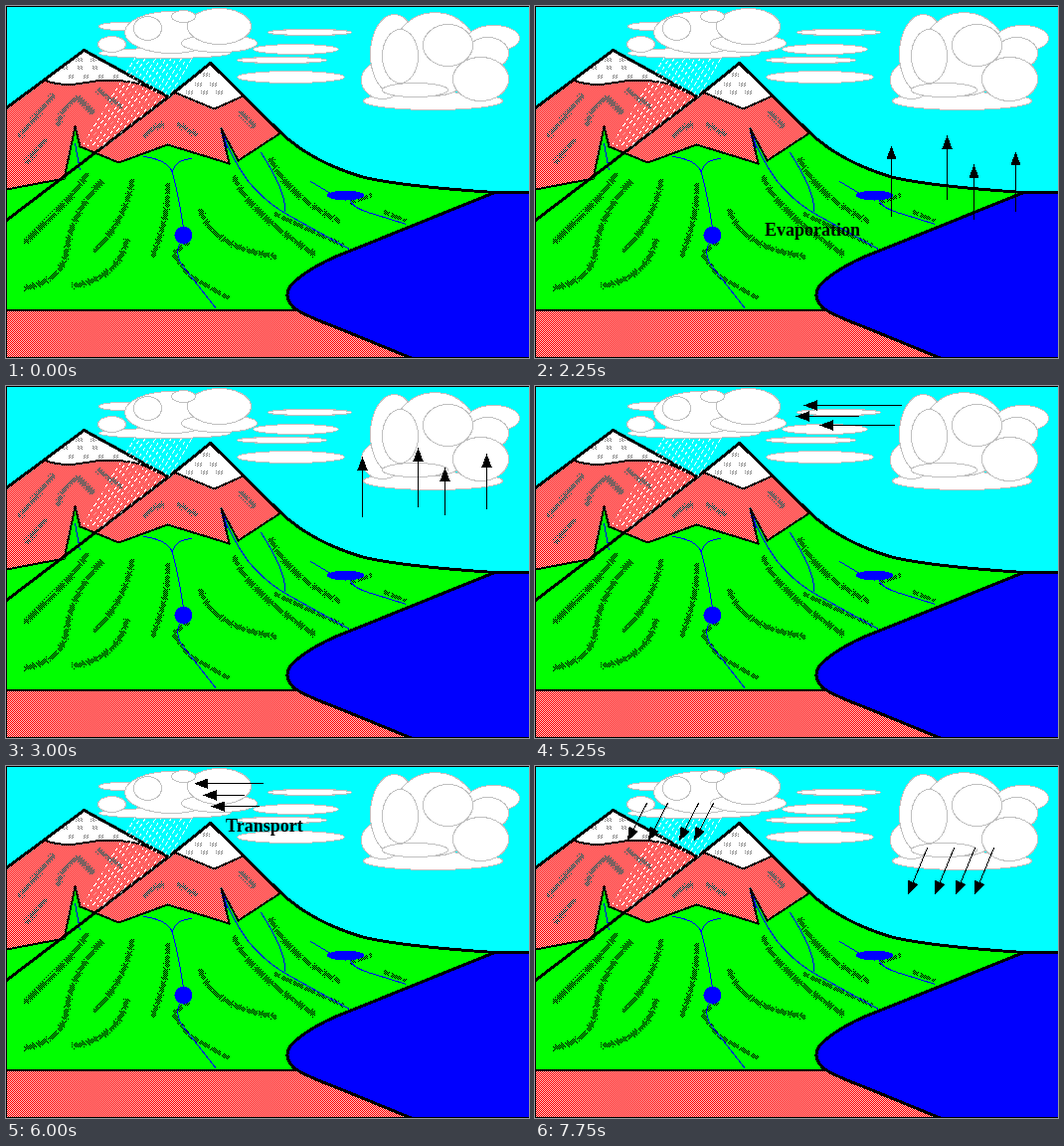
An HTML page for the animation above (8 s loop, 526 by 354 pixels).

```html
<!DOCTYPE html>
<html lang="en">
<head>
<meta charset="utf-8">
<title>Water cycle</title>
<style>
html, body { margin: 0; width: 100%; height: 100%; overflow: hidden; }
svg { display: block; width: 526px; height: 354px; overflow: hidden; shape-rendering: crispEdges; }
.ink { fill: none; stroke: #000; stroke-width: 3; stroke-linejoin: round; }
.rock { fill: url(#rock); }
.river { fill: none; stroke: #00f; }
.cloud { fill: #fff; stroke: #c0c0c0; }
.rain { fill: none; stroke: #fff; stroke-dasharray: 4 3; }
.core { fill: none; stroke: url(#dense); stroke-width: 4; stroke-dasharray: 11 2; }
.halo { fill: none; stroke: url(#sparse); stroke-width: 7; }
.fleck { fill: none; stroke: url(#grey); stroke-width: 4; stroke-dasharray: 7 8; }
#poses text { font: bold 18px "Liberation Serif", serif; }
#poses path { stroke: #000; }
#poses { animation: poses 8s step-end infinite; }
/* Each pose sits one stage height below the previous one. */
@keyframes poses {
  0% { transform: translateY(0); }
  18.75% { transform: translateY(-354px); }
  28.125% { transform: translateY(-708px); }
  37.5% { transform: translateY(-1062px); }
  46.875% { transform: translateY(-1416px); }
  65.625% { transform: translateY(-1770px); }
  75% { transform: translateY(-2124px); }
  84.375% { transform: translateY(-2478px); }
  96.875%, 100% { transform: translateY(-2832px); }
}
</style>
</head>
<body>
<svg viewBox="0 0 526 354">
  <defs>
    <pattern id="rock" width="2" height="2" patternUnits="userSpaceOnUse">
      <path fill="#f00" d="M0 0h2v2H0z"/><path fill="#ffc0c0" d="M1 0h1v1H1zM0 1h1v1H0z"/>
    </pattern>
    <pattern id="dense" width="2" height="2" patternUnits="userSpaceOnUse">
      <path d="M0 0h1v1H0zM1 1h1v1H1z"/>
    </pattern>
    <pattern id="sparse" width="4" height="4" patternUnits="userSpaceOnUse">
      <path d="M0 0h1v1H0zM2 2h1v1H2z"/>
    </pattern>
    <pattern id="grey" width="3" height="2" patternUnits="userSpaceOnUse">
      <path fill="#777" d="M0 0h1v1H0zM1 1h1v1H1z"/>
    </pattern>
    <path id="front" d="M0 215L163 91L205 57L276 127"/>
    <path id="slope" d="M276 127Q308 157 360 172Q400 181 491 187"/>
    <path id="foot" d="M0 184L58 173L69 121L74 141L113 157L162 139L224 158L216 123L233 155L276 127"/>
    <path id="back" d="M0 102L78 44L163 91"/>
    <path id="backSnow" d="M38 74Q55 81 77 77Q105 71 135 78L163 91L78 44z"/>
    <path id="frontSnow" d="M168 86L209 103L238 90L205 57z"/>
    <path id="sea" d="M530 187H491L330 252Q297 267 285 282Q278 293 290 304Q305 313 330 322L408 354V360H530z"/>
    <clipPath id="behindRidge"><path d="M70 40H200V61L163 91L69 162z"/></clipPath>
    <g id="gullies">
      <path d="M82 168Q64 198 18 238"/>
      <path d="M97 176Q66 208 61 245Q58 276 18 284"/>
      <path d="M127 174Q122 214 88 248"/>
      <path d="M122 234Q114 274 66 282"/>
      <path d="M163 178Q164 212 147 253"/>
      <path d="M229 171Q242 206 311 250"/>
      <path d="M195 204Q207 243 272 252"/>
      <path d="M266 153Q282 190 336 217"/>
    </g>
    <path id="crags" d="M48 89L13 132M73 92Q55 101 52 122M72 92L88 108M40 134L20 158M92 84L117 102M139 132Q146 122 160 119M172 118L192 130M235 106L250 122"/>
  </defs>

  <path fill="#0ff" d="M0 0H526V354H0z"/>
  <path class="rock" d="M0 102L78 44L163 92L205 57L276 127V190H0zM0 305H420V354H0z"/>
  <path fill="#0f0" d="M0 184L58 173L69 121L74 141L113 157L162 139L224 158L216 123L233 155L276 127Q308 157 360 172Q400 181 491 187V305H0z"/>
  <use href="#backSnow" fill="#fff"/><use href="#frontSnow" fill="#fff"/>
  <use href="#sea" fill="#00f"/>

  <use href="#gullies" class="halo"/><use href="#gullies" class="core"/>
  <use href="#crags" class="halo"/><use href="#crags" class="core" style="stroke-width:3"/>
  <path class="core" stroke-dashoffset="5" d="M184 237L168 249L184 271L224 294M270 209L340 241M346 198L368 190M380 207L402 216"/>
  <path class="fleck" d="M70 54H91M56 62H100M62 71H116M198 69H212M190 79H218M181 87H226"/>

  <g transform="translate(.5 .5)">
    <g class="river">
      <path d="M138 151Q162 154 167 167M187 153Q169 154 167 167Q173 190 178 222M174 239Q169 250 178 262L211 304"/>
      <path d="M69 138L74 165M216 124Q226 153 244 177Q261 197 282 209L345 244M256 147Q282 187 280 207"/>
      <path d="M306 176L326 188M346 195Q348 203 370 209L402 219"/>
      <path stroke-width="3" d="M217 126L221 143"/>
    </g>
    <circle cx="178" cy="230" r="9" fill="#00f"/>
    <ellipse cx="341" cy="190" rx="18.5" ry="5" fill="#00f"/>
    <g class="ink">
      <use href="#back"/><use href="#front"/><use href="#slope"/><use href="#sea"/>
      <g stroke-width="2"><use href="#backSnow"/><use href="#frontSnow"/><use href="#foot"/></g>
      <path style="stroke-width:2" d="M0 305H290"/>
    </g>
    <g id="rain" class="rain" clip-path="url(#behindRidge)"></g>
    <g id="clouds" class="cloud"></g>
    <path fill="none" stroke="#000" d="M526 0H0V353H526"/>
  </g>
  <g id="poses"></g>
</svg>
<script>
const svgNS = "http://www.w3.org/2000/svg";
const byId = id => document.getElementById(id);

function add(parent, tag, attrs = {}) {
  const node = document.createElementNS(svgNS, tag);
  for (const name in attrs) node.setAttribute(name, attrs[name]);
  return parent.appendChild(node);
}

function puff(cx, cy, rx, ry) {
  add(byId("clouds"), "ellipse", { cx, cy, rx, ry });
}

// Rain cloud over the mountains
puff(159, 47, 66, 5);
puff(115, 20, 22, 4);
puff(166, 26, 47, 21);
puff(106, 38, 14, 8);
puff(142, 22, 14, 12);
puff(214, 37, 38, 9);
puff(214, 20, 32, 18);
puff(178, 10, 12, 6);

// Thin streaks
puff(305, 26, 42, 3);
puff(291, 43, 43, 5);
puff(277, 54, 45, 3);
puff(286, 71, 54, 6);

// Tall cloud over the sea
puff(429, 95, 70, 9);
puff(378, 74, 21, 19);
puff(390, 48, 24, 40);
puff(431, 48, 43, 42);
puff(490, 32, 26, 13);
puff(484, 47, 21, 16);
puff(477, 73, 28, 22);
puff(444, 39, 25, 21);
puff(396, 50, 18, 27);
puff(411, 84, 33, 7);

for (let i = 0; i < 12; i++) {
  add(byId("rain"), "path", { d: `M${130 + 5.2 * i} 51l-54 90`, "stroke-dashoffset": i * 3 });
}

const lerp = (a, b, t) => a + (b - a) * t;

function arrow(group, x1, y1, x2, y2) {
  const length = Math.hypot(x2 - x1, y2 - y1);
  const angle = Math.atan2(y2 - y1, x2 - x1) * 180 / Math.PI;
  add(group, "path", {
    d: `M0 0H${-length}M0 0L-12 -4.5V4.5z`,
    transform: `translate(${x2} ${y2}) rotate(${angle})`
  });
}

function pose(index, label, x, y) {
  const group = add(byId("poses"), "g", { transform: `translate(.5 ${354 * index + .5})` });
  if (label) add(group, "text", { x, y }).textContent = label;
  return group;
}

// Vapour: tail and tip heights at the sea and at the cloud
const vapour = [
  { x: 358, sea: [283, 203], sky: [131, 72] },
  { x: 414, sea: [260, 191], sky: [121, 63] },
  { x: 441, sea: [290, 229], sky: [129, 83] },
  { x: 483, sea: [280, 217], sky: [123, 69] }
];

function rise(group, tipTime, tailTime = tipTime) {
  for (const { x, sea, sky } of vapour) {
    arrow(group, x, lerp(sea[0], sky[0], tailTime), x, lerp(sea[1], sky[1], tipTime));
  }
}

// Wind: [tail, tip, height] beside the sea cloud and over the mountains
const wind = [
  { start: [368, 271, 19], end: [180, 131, 16] },
  { start: [325, 263, 30], end: [178, 152, 28] },
  { start: [361, 287, 39], end: [178, 149, 41] }
];

function blow(group, time) {
  for (const { start, end } of wind) {
    const [tail, tip, y] = start.map((value, i) => lerp(value, end[i], time));
    arrow(group, tail, y, tip, y);
  }
}

function fall(group, y, length, ...columns) {
  for (const x of columns) arrow(group, x, y, x - 19, y + length);
}

rise(pose(1, "Evaporation", 230.5, 230.5), 0);
rise(pose(2, "Evaporation", 230.5, 230.5), .47);
rise(pose(3), 1);
rise(pose(4, "Condensation", 249.5, 90.5), 1.18, 1.27);
blow(pose(5), 0);
blow(pose(6, "Transport", 220.5, 65.5), .58);
blow(pose(7, "Transport", 220.5, 65.5), 1);
const rainfall = pose(8);
fall(rainfall, 37, 37, 112, 133, 164, 179);
fall(rainfall, 82, 46, 394, 421, 442, 461);
</script>
</body>
</html>
```
